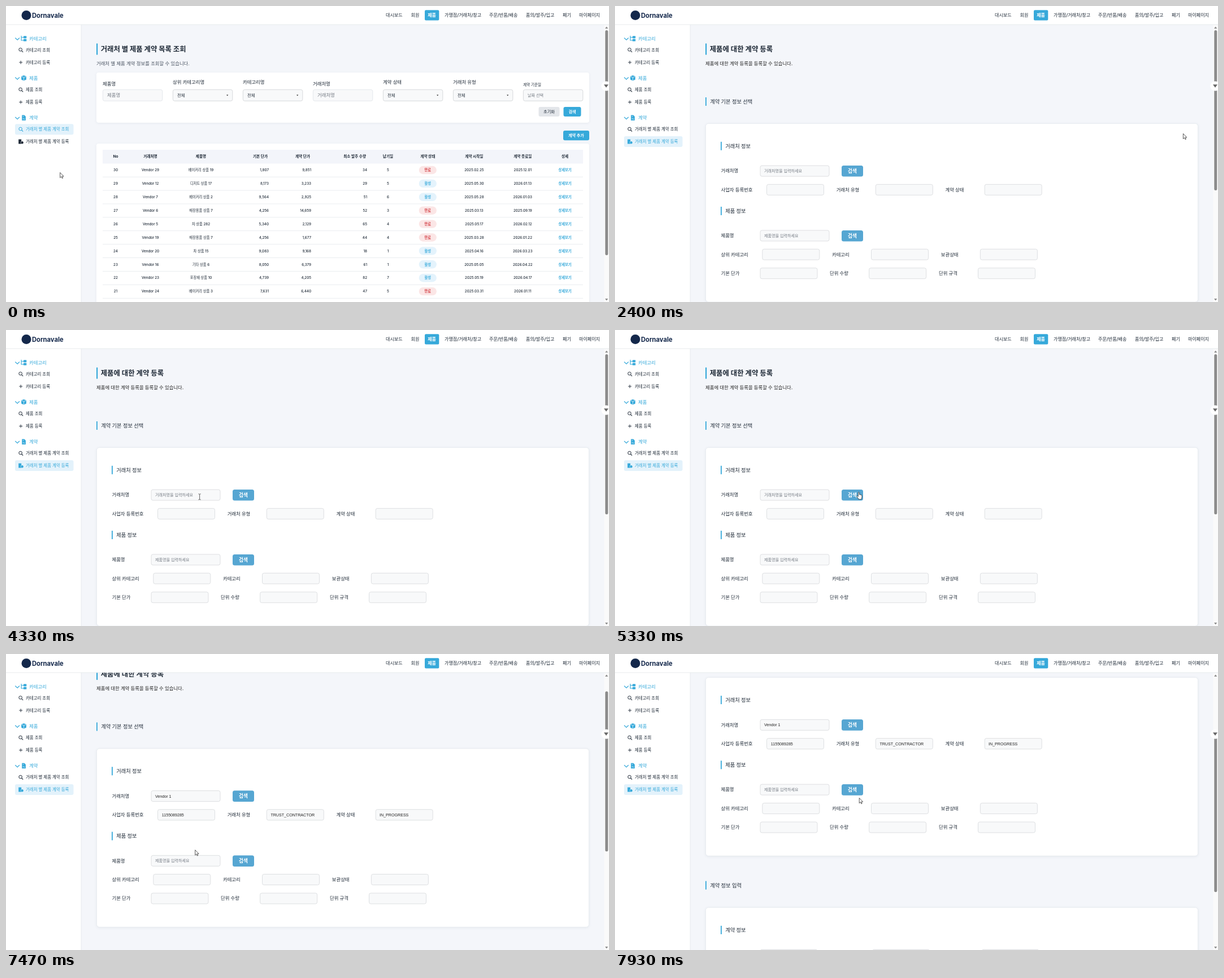
Recreate the animation shown at these times as an HTML page. Size 1067 by 525 pixels, loop 8 s.

```html
<!DOCTYPE html>
<html lang="ko">
<head>
<meta charset="utf-8">
<style>
  html, body { margin: 0; width: 100%; height: 100%; overflow: hidden; background: #f4f6fa; }
  svg { display: block; }
  text { font-family: Inter, "Noto Sans CJK KR", "Noto Sans CJK", sans-serif; white-space: pre; }
  text.form { font-family: "Liberation Sans", Arial, "Noto Sans CJK KR", sans-serif; }
  .card { filter: drop-shadow(0 1px 2px rgba(30, 50, 80, .07)); }
</style>
</head>
<body>
<svg id="stage" width="100%" height="100%" viewBox="0 0 1067 525"></svg>
<script>
const BLUE = '#36a9da', NAVY = '#14284b', INK = '#1f2a37', GRAY = '#757b84', BAR = '#8b8b8b';

// y is the vertical centre of the text
const text = (x, y, s, size, weight = 500, fill = INK, anchor = 'start', cls = '') =>
  `<text x="${x}" y="${y + size * 0.365}" font-size="${size}" font-weight="${weight}" fill="${fill}" text-anchor="${anchor}" class="${cls}">${s}</text>`;
const mid = (x, y, s, size, weight, fill) => text(x, y, s, size, weight, fill, 'middle');
const end = (x, y, s, size, weight, fill) => text(x, y, s, size, weight, fill, 'end');
const rect = (x, y, w, h, fill, r = 0, extra = '') =>
  `<rect x="${x}" y="${y}" width="${w}" height="${h}" rx="${r}" fill="${fill}" ${extra}/>`;
const path = (d, fill = 'none', stroke = 'none', width = 1) =>
  `<path d="${d}" fill="${fill}" stroke="${stroke}" stroke-width="${width}"/>`;
const at = (x, y, body) => `<g transform="translate(${x} ${y})">${body}</g>`;
const group = (id, body) => `<g id="${id}">${body}</g>`;
const box = (x, y, w, h = 19, fill = '#f8f9fa', line = '#d6d8db') =>
  rect(x, y, w, h, fill, 3, `stroke="${line}" stroke-width=".8"`);
const triangle = (x, y, r, dir, fill = BAR) => path(`M${x - r} ${y - dir * r * .7}h${2 * r}l${-r} ${dir * r * 1.4}z`, fill);

// Icons are centred on the origin
const icons = {
  search: c => `<circle cx="-.6" cy="-.7" r="2.8" fill="none" stroke="${c}"/>` + path('M1.4 1.3L4 3.9', 'none', c, 1.1),
  plus: c => path('M-3 0H3M0-3V3', 'none', c, .9),
  file: c => path('M-4-4H1V-1L-.5 1.5 1 4H-4z', c) + `<circle cx="2.4" cy="1.8" r="2.2" fill="${c}"/>`,
  folder: c => path('M-4.4-5V3.2H-.5M-4.4-2H-.5', 'none', c, 1.1) + rect(-.5, -4.6, 5.3, 4, c, .6) + rect(-.5, .7, 5.3, 4, c, .6),
  cube: c => path('M0-4.7L4.4-3V2.7L0 4.7-4.4 2.7V-3z', c) + path('M-4-2.7L0-1 4-2.7M0-1V4.3', 'none', '#fff', .7),
  doc: c => path('M-3.3-4.7H1L3.4-2.3V4.7H-3.3z', c) + path('M-1.8-2.4H0M-2 2.6L-.6 1 .2 2.4H2', 'none', '#fff', .7),
};

function header() {
  const nav = [[672, '대시보드'], [716.5, '회원'], [776, '가맹점/거래처/창고'], [855, '주문/반품/배송'],
    [920, '품의/발주/입고'], [985, '폐기'], [1014, '마이페이지']];
  return rect(0, 0, 1067, 33, '#fff') + rect(0, 32.6, 1067, .8, '#e2e5e9') +
    `<circle cx="36" cy="16.5" r="8.5" fill="${NAVY}"/>` + text(46, 16.7, 'Dornavale', 11.2, 700, NAVY) +
    nav.map(([x, s]) => text(x, 16, s, 8.05)).join('') +
    rect(741, 7.3, 25.3, 18.2, BLUE, 2) + mid(753.6, 16, '제품', 8.05, 700, '#fff');
}

function sidebar() {
  const heads = [[57.5, '카테고리', 'folder'], [127.5, '제품', 'cube'], [198, '계약', 'doc']];
  const items = [[78, '카테고리 조회', 'search'], [100, '카테고리 등록', 'plus'],
    [148.5, '제품 조회', 'search'], [170.5, '제품 등록', 'plus']];
  const links = [[218.7, '거래처 별 제품 계약 조회', 'search'], [240.5, '거래처 별 제품 계약 등록', 'file']];
  const item = ([y, s, icon], c) => at(26.2, y, icons[icon](c)) + text(35, y, s, 7.45, 500, c);
  const menu = active => links.map((l, i) => i === active
    ? rect(16, l[0] - 9.5, 103.5, 19, '#e3f2fb', 3) + item(l, BLUE) : item(l, INK)).join('');
  return rect(0, 33, 133, 492, '#fff') + rect(132.7, 33, .8, 492, '#e2e5e9') +
    heads.map(([y, s, icon], i) => path(`M16.3 ${y - 1}l3.8 3.6 3.8-3.6`, 'none', BLUE, 1.2) +
      at(31.5, y + .3, icons[icon](BLUE)) + text(41, y, s, 8.4, 500, BLUE)).join('') +
    items.map(i => item(i, INK)).join('') + group('menuList', menu(0)) + group('menuForm', menu(1));
}

function listPage() {
  const labels = ['제품명', '상위 카테고리명', '카테고리명', '거래처명', '계약 상태', '거래처 유형', '계약 기준일'];
  const filters = labels.map((s, i) => {
    const x = 171 + 124 * i, isInput = i % 3 === 0 && i < 6, isDate = i === 6;
    return text(x, isDate ? 140 : isInput ? 138 : 135, s, isDate ? 6.6 : 8.38, 500) +
      box(x + .4, 148.4, 105.4, 20, '#f8f9fa', isInput ? '#dfe3e8' : '#cfd1d4') +
      (isInput ? text(x + 8, 158, s, 8.4, 400, GRAY)
        : isDate ? text(x + 8, 158.5, '날짜 선택', 7.1, 400, GRAY)
        : text(x + 8, 158.5, '전체', 7.3) + triangle(x + 96.7, 158.5, 1.6, 1, '#222'));
  }).join('');
  const rows = `Vendor 29|베이커리 상품 19|1,807|9,851|34|5|만료|2025.02.25|2025.12.01
Vendor 12|디저트 상품 17|8,173|3,233|29|5|활성|2025.05.30|2026.01.13
Vendor 7|베이커리 상품 2|9,564|2,925|51|6|활성|2025.05.28|2026.01.03
Vendor 6|매장용품 상품 7|4,256|14,659|52|3|만료|2025.03.13|2025.09.19
Vendor 5|차 상품 282|5,340|2,129|65|4|만료|2025.05.17|2026.02.12
Vendor 19|매장용품 상품 7|4,256|1,677|44|4|만료|2025.03.28|2026.01.22
Vendor 20|차 상품 15|9,083|9,168|18|1|활성|2025.04.16|2026.03.23
Vendor 16|기타 상품 6|8,050|6,379|61|1|활성|2025.05.05|2026.04.22
Vendor 23|포장재 상품 10|4,739|4,205|82|7|활성|2025.05.19|2026.04.17
Vendor 24|베이커리 상품 3|7,631|6,440|47|5|만료|2025.03.31|2026.01.11`.split('\n');
  const columns = [194, 255.5, 345, 465, 540, 639, 676, 746.3, 828.4, 914.3, 989];
  const isNumber = i => i > 2 && i < 6;
  const names = 'No|거래처명|제품명|기본 단가|계약 단가|최소 발주 수량|납기일|계약 상태|계약 시작일|계약 종료일|상세'.split('|');
  const head = names.map((s, i) => isNumber(i) ? end(columns[i] - 2, 267, s, 6.65, 700) : mid(columns[i], 267, s, 6.65, 700)).join('');
  const body = rows.map((row, n) => {
    const y = 291 + 23.9 * n;
    return rect(171, y + 11.8, 850, .7, '#e1e5ea') + [30 - n, ...row.split('|'), '상세보기'].map((s, i) => {
      if (isNumber(i)) return end(columns[i], y, s, 6.25);
      if (i === 10) return mid(columns[i], y, s, 6.25, 700, BLUE);
      if (i !== 7) return mid(columns[i], y, s, 6.25);
      const expired = s === '만료';
      return rect(730.7, y - 7.2, 31.2, 14.4, expired ? '#fbe6e6' : '#e4f3fc', 7.2) +
        mid(columns[i], y, s, 6.25, 700, expired ? '#d23b40' : BLUE);
    }).join('');
  }).join('');
  return rect(160, 66.5, 2.2, 20, BLUE) + text(167.7, 76.3, '거래처 별 제품 계약 목록 조회', 12.35, 700) +
    text(160, 101.5, '거래처 별 제품 계약 정보를 조회할 수 있습니다.', 8.36, 400, '#4b5563') +
    rect(160, 118, 872, 89, '#fff', 4, 'class="card"') + filters +
    rect(942.5, 179, 37, 17, '#e3e6ea', 3) + mid(961, 187.5, '초기화', 7.2) +
    rect(986.5, 179, 31, 17, BLUE, 3) + mid(1002, 187.5, '검색', 7.2, 700, '#fff') +
    rect(986, 221, 46, 17.3, BLUE, 3, 'id="addButton"') + mid(1009, 229.7, '계약 추가', 7.1, 700, '#fff') +
    rect(160, 244, 872, 300, '#fff', 4, 'class="card"') + rect(171, 255, 850, 24.5, '#f3f5fa') + head + body;
}

function formPage() {
  const section = (x, y, s) => rect(x, y - 7.5, 1.8, 15, BLUE) + text(x + 8.3, y, s, 9.18, 500);
  const card = (y, h) => rect(160.4, y, 871.2, h, '#fff', 5, 'class="card" stroke="#e3e7ed" stroke-width=".8"');
  const field = (x, y, s, inputX, w = 101) => text(x, y - .3, s, 8.35, 500) + box(inputX, y - 9.6, w);
  const search = y => rect(401, y - 9.8, 38, 19.6, '#56a6d2', 3.5) + mid(420, y, '검색', 8.6, 700, '#fff');
  const hint = (y, s) => text(264, y - .2, s, 7.07, 400, GRAY, 'start', 'form');
  const value = (x, y, s) => text(x, y, s, 7.11, 400, '#222', 'start', 'form');
  const option = (y, s) => text(264, y, s, 8.5, 500, '#222');
  const kind = (x, y, s, w = 400) => text(x, y, s, 6.24, w, '#666');
  const dropdown = rect(257.3, 303.6, 121.4, 122, '#fff', 1, 'stroke="#c4c7cb" stroke-width=".8"') +
    '<svg x="257.7" y="304" width="120.6" height="121.2" viewBox="257.7 304 120.6 121.2">' +
    rect(257.7, 304, 112.8, 20.7, '#cfe5fc') + rect(370.5, 304, 8, 122, '#fafafa') +
    option(314.3, 'Vendor 6') + kind(310, 315, 'AGENCY', 500) + option(335.4, 'Vendor 1') + kind(271, 349.5, 'TRUST_CONTRACTOR') +
    option(369.8, 'Vendor 8') + kind(309, 370.5, 'SUPPLIER') + option(391, 'Vendor 3') + kind(271, 405, 'TRUST_CONTRACTOR') +
    option(425.4, 'Vendor 9') + triangle(374.4, 308.8, 2.5, -1) + rect(372, 314, 5, 44, BAR, 2.5) +
    triangle(374.4, 420.8, 2.5, 1) + '</svg>';
  return rect(160, 66.5, 2.2, 20, BLUE) + text(167.7, 76.3, '제품에 대한 계약 등록', 12.4, 700) +
    text(160, 101.7, '제품에 대한 계약 등록을 등록할 수 있습니다.', 8.37, 500, '#222') +
    section(160, 169.5, '계약 기본 정보 선택') + card(208.4, 316.6) + section(187, 248.3, '거래처 정보') +
    field(187.5, 292.7, '거래처명', 257, 122) + search(292.7) +
    field(187.5, 326, '사업자 등록번호', 268.5) + field(391.7, 326, '거래처 유형', 461.3) + field(584.5, 326, '계약 상태', 654.2) +
    section(187, 363.5, '제품 정보') + field(187.5, 407.5, '제품명', 257, 122) + hint(407.7, '제품명을 입력하세요') + search(407.7) +
    field(187.5, 440.8, '상위 카테고리', 260.8) + field(384, 440.8, '카테고리', 453.5) + field(576.8, 440.8, '보관상태', 646.4) +
    field(187.5, 474.3, '기본 단가', 257) + field(380, 474.3, '단위 수량', 449.6) + field(573, 474.3, '단위 규격', 642.5) +
    section(160, 577, '계약 정보 입력') + card(616.4, 200) + section(187, 656.3, '계약 정보') +
    [257, 455.5, 649].map(x => box(x, 691, 101)).join('') +
    group('emptyHint', hint(292.8, '거래처명을 입력하세요')) +
    group('vendorValues', value(264, 292.6, 'Vendor 1') + value(275.8, 326.2, '1155089285') +
      value(468.4, 326.2, 'TRUST_CONTRACTOR') + value(661, 326.2, 'IN_PROGRESS')) +
    group('dropdown', dropdown);
}

function scrollbar() {
  return rect(1058.5, 33.4, 9, 492, '#fafafa') + triangle(1062.7, 38.3, 2.6, -1) + triangle(1062.7, 520.8, 2.6, 1) +
    rect(1060.3, 43, 5, 399, BAR, 2.5, 'id="thumb"') +
    '<circle cx="1062" cy="142" r="8.6" fill="#fff"/>' + triangle(1062, 142, 4, 1, '#666');
}

// Positions are the top-left corner of each pointer shape
const pointers = {
  arrow: path('M.4.4V9.6L2.6 7.6 4 10.7 5.4 10.1 4.1 7.1H6.8z', '#fff', '#222', .75),
  hand: path('M3 1.4C3 .4 5 .4 5 1.4V5C5.4 4.4 6.6 4.5 6.6 5.4 7 4.8 8.2 5 8.2 5.9 8.7 5.4 9.6 5.8 9.6 6.7V9.5C9.6 11 8.7 11.6 8.7 13.3H3.8C3.6 11.5 1.5 10.2.6 8.2.2 7.2 1.4 6.7 2 7.4L3 8.4z', '#fff', '#222', .75),
  beam: path('M.5.5H2L2.6 1.1 3.2.5H4.7M2.6 1V10M.5 10.5H2L2.6 9.9 3.2 10.5H4.7', 'none', '#222', .7),
};
const track = [ // time, x, y, shape until the next entry
  [0, 95.3, 295, 'arrow'], [210, 95.3, 295, 'arrow'], [600, 240, 262, 'arrow'], [1070, 681, 219, 'arrow'],
  [1330, 923.3, 216.8, 'arrow'], [1460, 955, 219, 'arrow'], [1600, 966, 221, 'arrow'], [1810, 966, 221, 'arrow'],
  [1960, 988, 224, 'hand'], [2130, 1005, 226, 'hand'], [2400, 1005, 226, 'arrow'], [2460, 1005, 226, 'arrow'],
  [2800, 700, 270, 'arrow'], [3070, 520, 295, 'arrow'], [3200, 501.3, 298.3, 'arrow'], [3460, 380, 300, 'beam'],
  [3530, 340, 296, 'beam'], [4210, 340, 296, 'beam'], [4530, 340, 281, 'beam'], [4670, 340, 281, 'beam'],
  [4760, 380, 284, 'arrow'], [4800, 401, 286, 'hand'], [4860, 440, 288, 'arrow'], [4930, 467, 288, 'arrow'],
  [5030, 437, 287, 'hand'], [5130, 428.5, 286, 'hand'], [5270, 428.5, 286, 'hand'], [5330, 427.3, 287, 'hand'],
  [5670, 427.3, 287, 'hand'], [5790, 405, 302, 'arrow'], [5860, 378, 318, 'hand'], [6130, 326, 359, 'hand'],
  [6270, 328.6, 352.6, 'hand'], [6470, 328.6, 352.6, 'hand'], [6535, 332.6, 350, 'arrow'], [6730, 334.3, 345.3, 'arrow'],
  [7140, 334.3, 345.3, 'arrow'], [7200, 334.3, 347.2, 'arrow'], [7560, 334.3, 347.2, 'arrow'],
  [7930, 431.8, 255, 'arrow'], [8000, 431.8, 255, 'arrow'],
];

const $ = id => document.getElementById(id);
$('stage').innerHTML = rect(0, 0, 1067, 525, '#f4f6fa') + group('listPage', listPage()) + group('formPage', formPage()) +
  scrollbar() + sidebar() + header() +
  group('pointer', Object.keys(pointers).map(k => group(k, pointers[k])).join(''));

const show = (id, on) => { $(id).style.display = on ? '' : 'none'; };

function render(t) {
  const onForm = t >= 2400, filled = t >= 6530;
  show('listPage', !onForm);
  show('menuList', !onForm);
  show('formPage', onForm);
  show('menuForm', onForm);
  show('dropdown', t >= 5530 && !filled);
  show('emptyHint', !filled);
  show('vendorValues', filled);
  $('addButton').setAttribute('fill', t >= 1960 ? '#2f98c8' : BLUE);

  const u = Math.min(1, Math.max(0, (t - 7336) / 420));
  const scroll = 166.8 * u * u * (3 - 2 * u);
  $('formPage').setAttribute('transform', `translate(0 ${-scroll})`);
  $('thumb').setAttribute('height', onForm ? 284 : 399);
  $('thumb').setAttribute('y', 43 + scroll * 0.571);

  const i = track.findIndex(k => k[0] > t) - 1;
  const [t0, x0, y0, shape] = track[i], [t1, x1, y1] = track[i + 1];
  const k = (t - t0) / (t1 - t0);
  $('pointer').setAttribute('transform', `translate(${x0 + (x1 - x0) * k} ${y0 + (y1 - y0) * k})`);
  for (const name in pointers) show(name, name === shape);
}

function frame() {
  render(performance.now() % 8000);
  requestAnimationFrame(frame);
}
frame();
</script>
</body>
</html>
```
